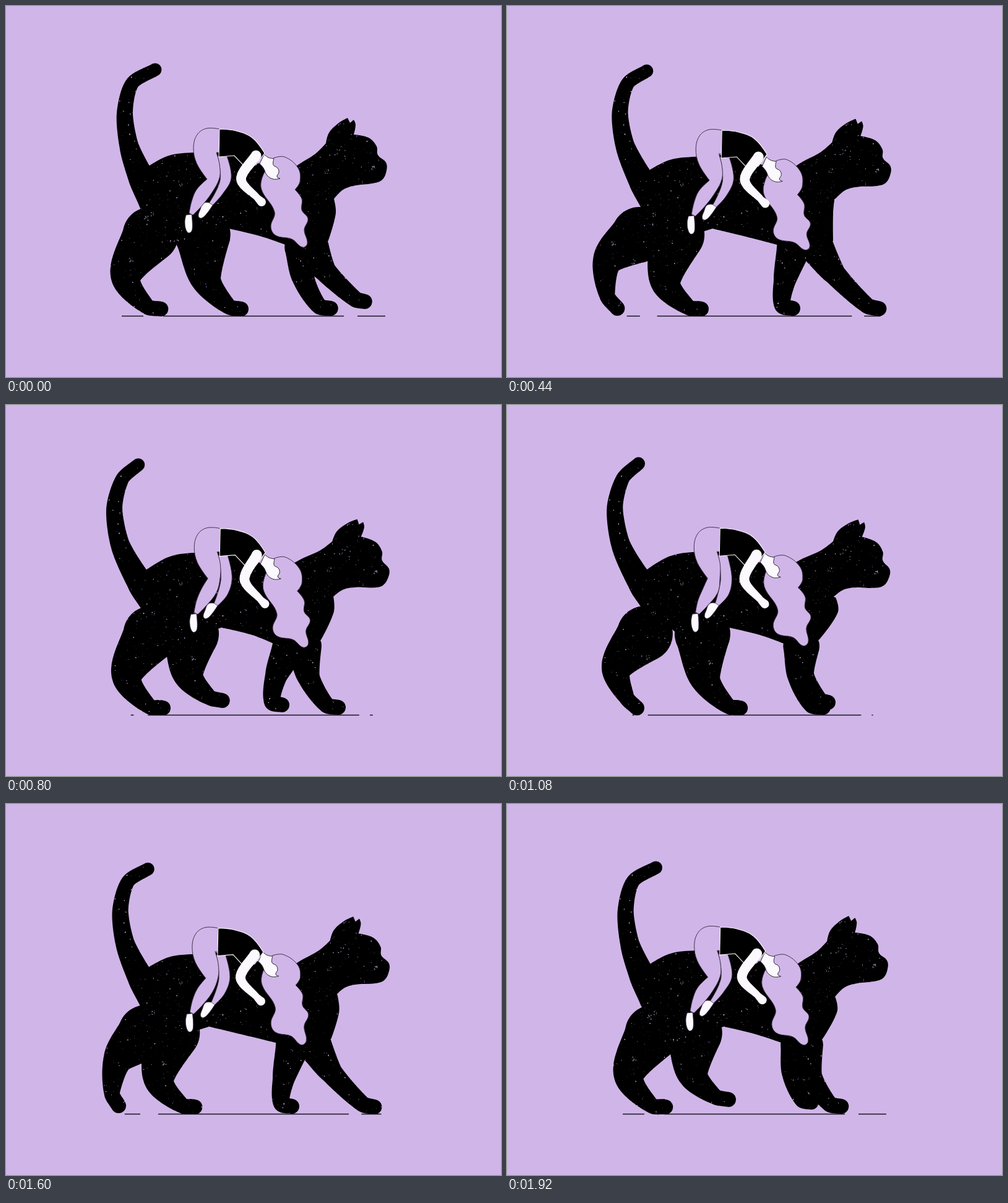
These frames come from a looping animation (800x600 px, 1960 ms). An HTML page with a canvas:

```html
<!DOCTYPE html>
<html lang="en">
<head>
<meta charset="utf-8">
<title>Cat ride</title>
<style>
html, body { margin: 0; width: 100%; height: 100%; overflow: hidden; background: #d0b6e8; }
canvas { display: block; }
</style>
</head>
<body>
<canvas id="stage" width="800" height="600"></canvas>
<script>
const ctx = document.getElementById('stage').getContext('2d');
const LOOP = 1960, STEP = 40;
const LILAC = '#d0b6e8', WHITE = '#fbf9fe', INK = '#40304c';

const numbers = text => text.split(/[ ,]/).map(Number);
const mix = (a, b, u) => a + (b - a) * u;

// Gait cycles: hock, ankle and toe from planting through push-off to reaching
const hindGait = [
  '323,442 360,486 380,490', '256,446 293,487 314,490', '195,438 231,487 254,490', '177,425 193,473 210,491',
  '161,405 152,466 168,488', '182,411 171,467 182,488', '300,437 336,473 358,478'
].map(numbers);
const foreGait = [
  '532,432 587,484 606,489', '489,440 518,485 537,489', '472,440 492,485 511,489', '449,443 445,484 462,489',
  '437,437 430,480 446,485', '478,436 505,477 519,481', '530,425 588,474 604,478'
].map(numbers);

// Each leg passes through its gait's poses at its own times, from pose `first`
const keys = (gait, first, times) => times.map((t, i) => ({ t, v: gait[(first + i) % gait.length] }));
const legs = {
  farFore: keys(foreGait, 5, [-200, 110, 400, 800, 1080, 1600, 1760, 2000]),
  nearFore: keys(foreGait, 1, [-120, 120, 440, 800, 1080, 1360, 1520, 1940]),
  farHind: keys(hindGait, 0, [0, 440, 800, 1080, 1460, 1600, 1920, 1960]),
  nearHind: keys(hindGait, 2, [-25, 270, 520, 620, 815, 1040, 1540, 1935, 2230])
};

// Hermite interpolation over unevenly timed keys
function sample(track, t) {
  const last = track.length - 1;
  let i = 0;
  while (i < last - 1 && t >= track[i + 1].t) i++;
  const a = track[i], b = track[i + 1], span = b.t - a.t, u = (t - a.t) / span;
  const slope = (k, j) => {
    const p = track[Math.max(0, k - 1)], n = track[Math.min(last, k + 1)];
    return (n.v[j] - p.v[j]) / (n.t - p.t) * span;
  };
  return a.v.map((v, j) => {
    const d = b.v[j] - v, m = slope(i, j), n = slope(i + 1, j);
    return v + u * (m + u * (3 * d - 2 * m - n + u * (m + n - 2 * d)));
  });
}

// Closed smooth outline through flat x,y points; listed points stay sharp
function outline(p, corners = []) {
  const n = p.length / 2, path = new Path2D();
  const at = i => { i = (i + n) % n; return [p[2 * i], p[2 * i + 1]]; };
  const handle = (i, len) => {
    const [x, y] = at(i);
    if (corners.includes((i + n) % n)) return [x, y];
    const [ax, ay] = at(i - 1), [bx, by] = at(i + 1);
    const k = len / (Math.hypot(bx - ax, by - ay) || 1);
    return [x + (bx - ax) * k, y + (by - ay) * k];
  };
  path.moveTo(...at(0));
  for (let i = 0; i < n; i++) {
    const a = at(i), b = at(i + 1), len = Math.hypot(b[0] - a[0], b[1] - a[1]) * .36;
    path.bezierCurveTo(...handle(i, len), ...handle(i + 1, -len), ...b);
  }
  path.closePath();
  return path;
}

// Round brush drawn along joints [x, y, radius]
function brush(joints) {
  const path = new Path2D(), last = joints.length - 1;
  const tangent = (i, len) => {
    const a = joints[Math.max(0, i - 1)], b = joints[Math.min(last, i + 1)];
    const k = len / Math.hypot(b[0] - a[0], b[1] - a[1]);
    return [(b[0] - a[0]) * k, (b[1] - a[1]) * k];
  };
  for (let i = 0; i < last; i++) {
    const a = joints[i], b = joints[i + 1], len = Math.hypot(b[0] - a[0], b[1] - a[1]) * .8;
    const m = tangent(i, len), n = tangent(i + 1, len);
    for (let u = 0; u <= 1; u += 1 / 32) {
      const [x, y] = [0, 1].map(j => {
        const d = b[j] - a[j];
        return a[j] + u * (m[j] + u * (3 * d - 2 * m[j] - n[j] + u * (m[j] + n[j] - 2 * d)));
      });
      const r = mix(a[2], b[2], u);
      path.moveTo(x + r, y);
      path.arc(x, y, r, 0, 7);
    }
  }
  return path;
}

let seed = 7;
const random = () => (seed = seed * 16807 % 2147483647) / 2147483647;
const grain = new Path2D();
const speck = (x, y, s) => grain.rect(x, y, s, s * (.6 + random() * .7));
for (let i = 0; i < 2800; i++)
  speck(80 + random() * 600, 60 + random() * 470, .4 + 1.2 * random() ** 4);
for (let i = 0; i < 40; i++) {
  const x = 120 + random() * 520, y = 80 + random() * 430;
  for (let j = 0; j < 8; j++) speck(x + random() * 6, y + random() * 7, .4 + random());
}

function catPart(path, dx = 0, dy = 0) {
  ctx.save();
  ctx.fillStyle = '#000';
  ctx.fill(path);
  ctx.clip(path);
  ctx.translate(dx, dy);
  ctx.fillStyle = '#cbb9e3';
  ctx.fill(grain);
  ctx.restore();
}

// The thigh or shoulder follows the hock by a fixed share
function leg(track, t, follow, radii) {
  const [hx, hy, ax, ay, tx, ty] = sample(track, t);
  const top = follow(hx);
  const joints = [[...top, radii[0]], [hx, hy, radii[1]], [ax, ay, radii[2]], [tx, Math.min(ty, 490), radii[3]]];
  catPart(brush(joints), hx - track[0].v[0], hy - track[0].v[1]);
  return { top: top[0], hock: hx };
}
const hind = (track, t) => leg(track, t, x => [230 + .65 * (x - 188), 370], [45, 24, 12.5, 12]);
const fore = (track, t) => leg(track, t, x => [482 + .45 * (x - 489), 390], [28, 18, 13, 12]);

const skull = outline(numbers('430,290 469,259 500,239 517,222 522,205 538,189 552,181 556,189 562,184 565,192 562,208 586,213 599,227 601,241 614,253 615,266 608,281 592,287 566,290 545,297 530,312 490,330'),
  [0, 3, 6, 7, 8, 10, 20, 21]);

// Shared rhythms: slow sway, two bounces per loop, and a side swing
function rhythm(t) {
  const a = 2 * Math.PI * t / LOOP, slow = (1 - Math.cos(a)) / 2;
  return { slow, sway: slow ** .75, bounce: (1 - Math.cos(2 * a)) / 2, swing: Math.sin(a) };
}

function drawCat(t, { slow, sway, bounce, swing }) {
  catPart(brush([
    [241 - 29 * sway, 103 - 9 * sway + 7 * bounce, 10.5],
    [204 - 17 * sway, 125 - 7 * sway + 4 * bounce, 11],
    [192 - 18 * sway, 173 - 7 * sway + 3 * bounce, 13],
    [199 - 15 * sway, 227, 15.5],
    [218 - sway, 276 + 13 * sway, 21],
    [240, 315, 26]
  ]), -18 * sway);

  const shoulders = [fore(legs.farFore, t), fore(legs.nearFore, t)].map(l => l.top);
  const hocks = [hind(legs.farHind, t), hind(legs.nearHind, t)].map(l => l.hock);
  const groin = 327 + .42 * (Math.max(...hocks) - 244);
  catPart(outline([
    232 - 6 * sway, 258 + 8 * sway + 4 * bounce,
    263, 242 + 6 * bounce + 2 * sway,
    304, 237 + 7 * bounce,
    365, 238 + 4 * bounce,
    425, 262,
    530 + 3 * bounce - 3 * swing, 312 - 5 * bounce,
    533 - 6 * swing, 335,
    Math.max(...shoulders) + 27, 380,
    Math.min(...shoulders) - 24, 387,
    groin + 50, 372,
    groin, 360,
    groin - 70, 382,
    204 + 4 * slow, 294 + 17 * sway + 3 * bounce
  ], [0, 4, 5, 7, 8, 10, 11, 12]));

  ctx.save();
  ctx.translate(560 + 3 * bounce - 4 * slow, 312 + 4 * slow);
  ctx.rotate(.15 * sway);
  ctx.translate(-560, -312);
  catPart(skull);
  ctx.restore();
}

function shape(points, fill, stroke, width, corners) {
  const path = outline(points, corners);
  ctx.fillStyle = fill;
  ctx.strokeStyle = stroke;
  ctx.lineWidth = width;
  ctx.fill(path);
  ctx.stroke(path);
}

function drawGirl({ slow, sway, bounce, swing }) {
  const body = [2.3 * swing, 2 * bounce];
  const head = [2.3 * swing, 2 * bounce + 2.5 * swing];
  const near = [9 * slow ** 1.6, 2 * bounce];
  const far = [8.5 * sway, 2 * bounce + 2 * sway];
  const hand = [4.5 * slow + 2.5 * swing, 5 * sway];
  const move = (text, by) => numbers(text).map((v, i) => v + by[i % 2]);

  shape([...move('342,243 357,243 364,278', body), ...move('350,304 333,323 328,319', far),
    ...move('346,282', body)], LILAC, INK, .9, [0, 1, 4, 5]);
  shape(move('328,318 334,322 325,335 316,343 311,340 314,329 319,319', far), WHITE, INK, .8, [0, 1]);
  shape([...move('345,199 324,198 309,208 303,229 308,254 325,280', body),
    ...move('308,297 300,316 296,335 302,338 314,326 332,303', near),
    ...move('345,278 345,256 340,237 345,237', body)], LILAC, INK, 1, [0, 5, 8, 9, 14, 15]);
  shape(move('291,338 300,337 301,361 296,367 291,362 289,349', near), WHITE, INK, .8, [0, 1]);

  // Hair hangs from the head; its middle swings most
  const hair = numbers('450,244 472,262 475,284 467,297 478,312 478,330 488,344 482,362 487,384 479,390 462,377 436,371 428,357 434,333 413,297 415,275 432,246')
    .map((v, i, p) => {
      const depth = Math.sin(Math.PI * (p[i | 1] - 244) / 146);
      return v + head[i % 2] + depth * (i % 2 ? 4 * swing : 4 * sway - 2 * swing);
    });
  shape(hair, LILAC, INK, 1, [3, 16]);
  shape(move('417,240 424,245 433,247 432,257 439,262 441,269 438,276 443,279 432,280 422,274 416,262 410,255', head),
    WHITE, '#17111c', .9, [0, 2, 7, 11]);
  shape(move('345,199 372,202 398,213 418,238 404,257 384,258 369,242 344,244', body),
    '#000', WHITE, 1.1, [0, 3, 4, 5, 6, 7]);
  ctx.fillStyle = WHITE;
  ctx.fill(brush([
    [404 + body[0], 242 + body[1], 8.5],
    [380 + hand[0], 280 + hand[1] / 2, 8],
    [406 + hand[0], 310 + hand[1], 5.5],
    [413 + hand[0], 317 + hand[1], 7]
  ]));
}

function drawGround({ slow }) {
  ctx.strokeStyle = '#17111c';
  ctx.lineWidth = 1.5;
  ctx.beginPath();
  for (const [a, b] of [
    [187 + 16 * slow, 222 - 17 * slow],
    [254 - 27 * slow, 546 + 27 * slow],
    [568 + 22 * slow, 613 - 22 * slow]
  ]) {
    ctx.moveTo(a, 501.5);
    ctx.lineTo(b, 501.5);
  }
  ctx.stroke();
}

function draw() {
  const t = Math.floor(performance.now() % LOOP / STEP) * STEP;
  const beat = rhythm(t);
  ctx.fillStyle = LILAC;
  ctx.fillRect(0, 0, 800, 600);
  drawGround(beat);
  drawCat(t, beat);
  drawGirl(beat);
  requestAnimationFrame(draw);
}
draw();
</script>
</body>
</html>
```
